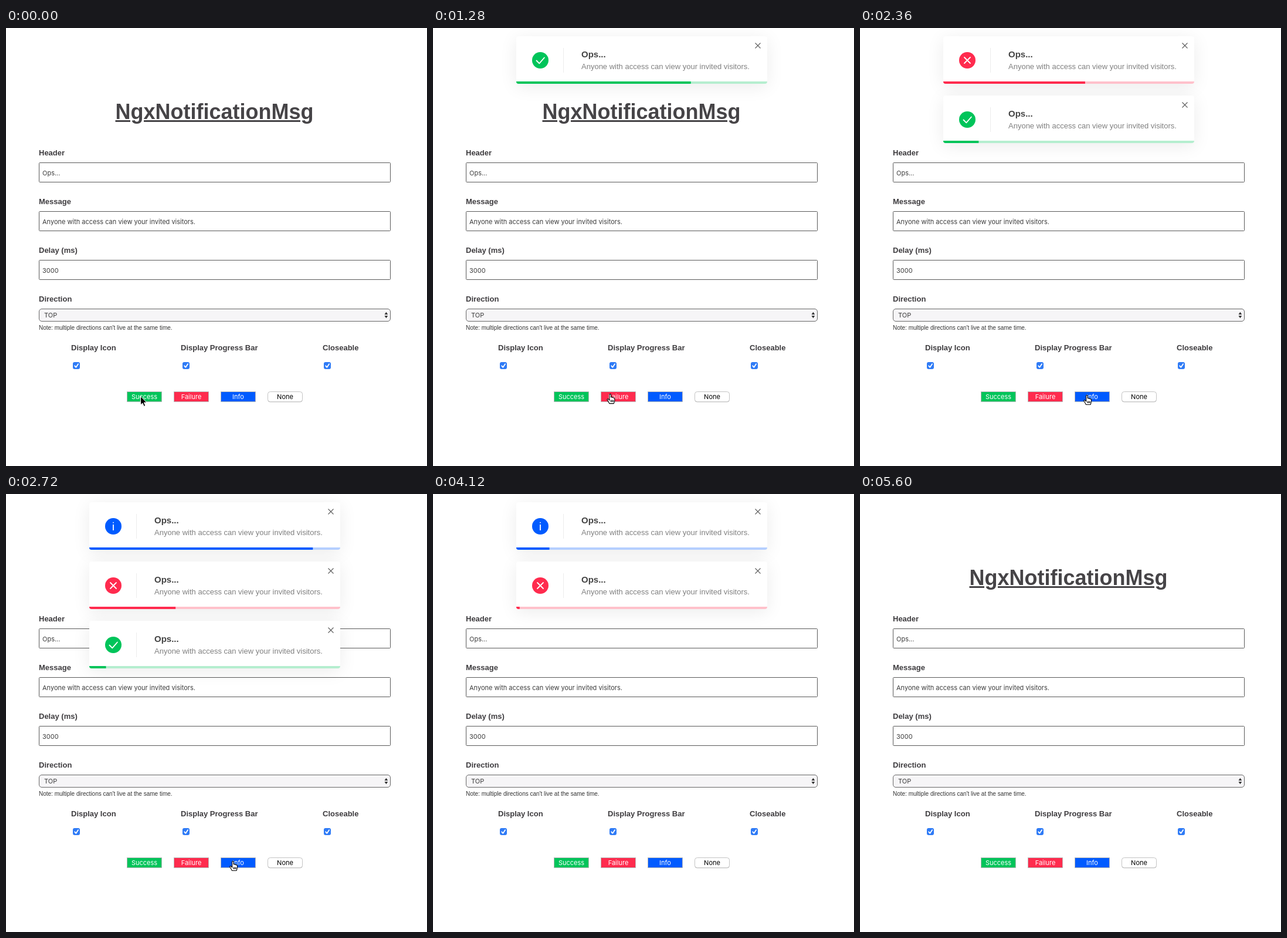
An HTML page that plays this animation: 718x746 px, repeating every 5.92 s.

```html
<!DOCTYPE html>
<html lang="en">
<head>
<meta charset="utf-8">
<title>Notification demo</title>
<style>
html, body { margin: 0; width: 100%; height: 100%; overflow: hidden; background: #fff; }
body { position: relative; font-family: Arial, "Liberation Sans", sans-serif; }
svg { position: absolute; left: 0; top: 0; }
h1 { position: absolute; left: 0; top: 122px; width: 711px; margin: 0; text-align: center;
  font: bold 36px/41px Arial, "Liberation Sans", sans-serif; color: #464447;
  text-decoration: underline; text-decoration-thickness: 3px; }
.label { font-weight: bold; font-size: 13px; fill: #3e3c3f; }
.ui { font: 11px Inter, sans-serif; fill: #3c3c3c; }
.card { position: absolute; left: 142px; top: 14px; width: 428px; height: 81px; background: #fff;
  border-radius: 4px; box-shadow: 0 5px 30px rgba(0, 0, 0, .08); display: none; }
.card svg { border-radius: 4px; }
.line { fill: none; stroke: #fff; stroke-width: 1.8; stroke-linecap: round; stroke-linejoin: round; }
</style>
</head>
<body>
<h1>NgxNotificationMsg</h1>
<svg id="page" width="718" height="746"></svg>
<div id="cards"></div>
<svg width="718" height="746">
  <g id="cursor">
    <path id="arrow" d="M0 0V15L3.4 11.9L5.9 17.4L8.3 16.3L5.9 11H10.5Z" stroke="#fff" stroke-width="1"/>
    <g id="hand" stroke="#000" stroke-width="1.1" stroke-linejoin="round" fill="none">
      <path fill="#fff" d="M-1.3 1.2Q0-.7 1.3 1.2V5.8Q2.6 4.8 3.5 6.3Q4.8 5.5 5.6 7Q7.2 6.5 7.5 8.2V11.5Q7.2 13.8 6 16.5H-1.5Q-3 13.5-5 10.5Q-5.5 8.3-3.4 8.8L-1.3 11Z"/>
      <path d="M1.2 10.5V14M3.2 10.5V14M5.2 10.5V14"/>
    </g>
  </g>
</svg>
<script>
const LOOP = 5920, STEP = 40, LIFE = 3000, CARD_H = 81, PITCH = 101;
const MESSAGE = 'Anyone with access can view your invited visitors.';
const GREEN = '#00c45a', RED = '#ff2b4e', BLUE = '#005bff';
const $ = id => document.getElementById(id);
const clamp = v => Math.min(1, Math.max(0, v));

const text = (cls, x, y, str, extra = '') =>
  `<text class="${cls}" x="${x}" y="${y}" ${extra}>${str}</text>`;

function field(y, label, value) {
  return text('label', 56, y, label) + text('ui', 62, y + 34, value) +
    `<rect x="56.5" y="${y + 12.5}" width="599" height="33" rx="1" fill="none" stroke="#5a5a5a"/>`;
}

function option(x, cx, label) {
  return text('label', x, 549, label) +
    `<rect x="${cx - 6}" y="569" width="12" height="12" rx="3" fill="#2f7bf6"/>
     <path class="line" d="M${cx - 2.8} 575.4l2.1 2.5 3.8-5.6"/>`;
}

function button(i, label, fill) {
  const x = 206 + i * 80;
  const box = fill
    ? `<rect x="${x + .5}" y="619.5" width="59" height="17" fill="${fill}" stroke="#b9b9b9"/>`
    : `<rect x="${x + .5}" y="620.2" width="59" height="17" rx="4" fill="#aaa"/>
       <rect x="${x + .5}" y="619.5" width="59" height="17" rx="4" fill="#fff" stroke="#c4c4c4"/>`;
  return box + text('ui', x + 30, 632, label,
    `text-anchor="middle" style="fill:${fill ? '#fff' : '#000'}"`);
}

$('page').innerHTML =
  field(217, 'Header', 'Ops...') + field(300, 'Message', MESSAGE) + field(383, 'Delay (ms)', '3000') +
  text('label', 56, 466, 'Direction') +
  `<rect x="56.5" y="478.5" width="599" height="21" rx="4.5" fill="#f6f5f7" stroke="#666"/>
   <path d="M645.5 488l2.9-4.2 2.9 4.2zM645.5 490l2.9 4.2 2.9-4.2z" fill="#333"/>` +
  text('ui', 65, 493, 'TOP') +
  text('', 56, 514, "Note: multiple directions can't live at the same time.", 'font-size="10" fill="#333"') +
  option(111, 120, 'Display Icon') + option(298, 307, 'Display Progress Bar') +
  option(540, 548, 'Closeable') +
  button(0, 'Success', GREEN) + button(1, 'Failure', RED) + button(2, 'Info', BLUE) + button(3, 'None');

const cards = [
  { born: 668, color: GREEN, icon: 'M34.5 41.5l4.8 4.8 8.6-9.8' },
  { born: 1574, color: RED, icon: 'M36 36l10 10M46 36l-10 10' },
  { born: 2393, color: BLUE, icon: 'M41 38.7v8.5M41 34.6v.1' }
];

for (const c of cards) {
  c.el = document.createElement('div');
  c.el.className = 'card';
  c.el.innerHTML = `<svg width="428" height="81">
    <circle cx="41" cy="41" r="14" fill="${c.color}"/><path class="line" d="${c.icon}"/>
    <path d="M80.5 20V62" stroke="#ececec"/>
    ${text('', 111, 36, 'Ops...', 'font-size="15" font-weight="bold" fill="#444"')}
    ${text('', 111, 56, MESSAGE, 'font-size="13" fill="#808080"')}
    <path d="M407.5 11.5l9 9M416.5 11.5l-9 9" stroke="#666" stroke-width="1.3"/>
    <rect y="77" width="428" height="4" fill="${c.color}" opacity=".29"/>
    <rect class="bar" y="77" height="4" fill="${c.color}"/></svg>`;
  c.bar = c.el.querySelector('.bar');
  $('cards').prepend(c.el);
}
// Older cards sit lower and paint on top.
cards.slice().reverse().forEach(c => $('cards').append(c.el));

// CSS "ease": cubic-bezier(.25, .1, .25, 1)
function ease(x) {
  x = clamp(x);
  let lo = 0, hi = 1;
  for (let i = 0; i < 24; i++) {
    const s = (lo + hi) / 2;
    if (.75 * s * (1 - s) + s ** 3 < x) lo = s; else hi = s;
  }
  return .3 * lo * (1 - lo) ** 2 + 3 * lo * lo * (1 - lo) + lo ** 3;
}

function drawCards(t) {
  const latest = cards.filter(c => c.born <= t).pop();
  cards.forEach((c, i) => {
    const age = t - c.born;
    const leave = ease((age - 2960) / 240);
    const visible = age >= 0 && leave < 1;
    c.el.style.display = visible ? 'block' : 'none';
    if (!visible) return;
    const slot = cards.indexOf(latest) - i;
    // Only the lowest card slides when a new one is added.
    const enter = i ? 1 : ease((t - latest.born - 4) / 300);
    const y = slot * PITCH - CARD_H * (1 - enter + leave);
    c.el.style.transform = `translateY(${y}px)`;
    c.el.style.opacity = (latest === c ? enter : 1) * (1 - leave);
    c.bar.setAttribute('width', 428 * (1 - ease(age / LIFE)));
  });
}

// start time, end time, destination
const moves = [[960, 1420, 323, 622], [1780, 2200, 387, 625], [2940, 3320, 405, 760]];

function drawCursor(t) {
  let x = 229.5, y = 627;
  for (const [from, to, tx, ty] of moves) {
    const k = clamp((t - from) / (to - from)), s = k * k * (3 - 2 * k);
    x += (tx - x) * s;
    y += (ty - y) * s;
  }
  const over = t >= 560 && y < 637 && x < 426 && (x - 206) % 80 < 60;
  $('cursor').setAttribute('transform', `translate(${x} ${y})`);
  $('arrow').style.display = over ? 'none' : '';
  $('hand').style.display = over ? '' : 'none';
}

const start = performance.now();
function frame() {
  const t = Math.floor((performance.now() - start) % LOOP / STEP) * STEP;
  drawCards(t);
  drawCursor(t);
  // The pointer has left the stage before the loop's final hold.
  requestAnimationFrame(frame);
}
frame();
</script>
</body>
</html>
```
